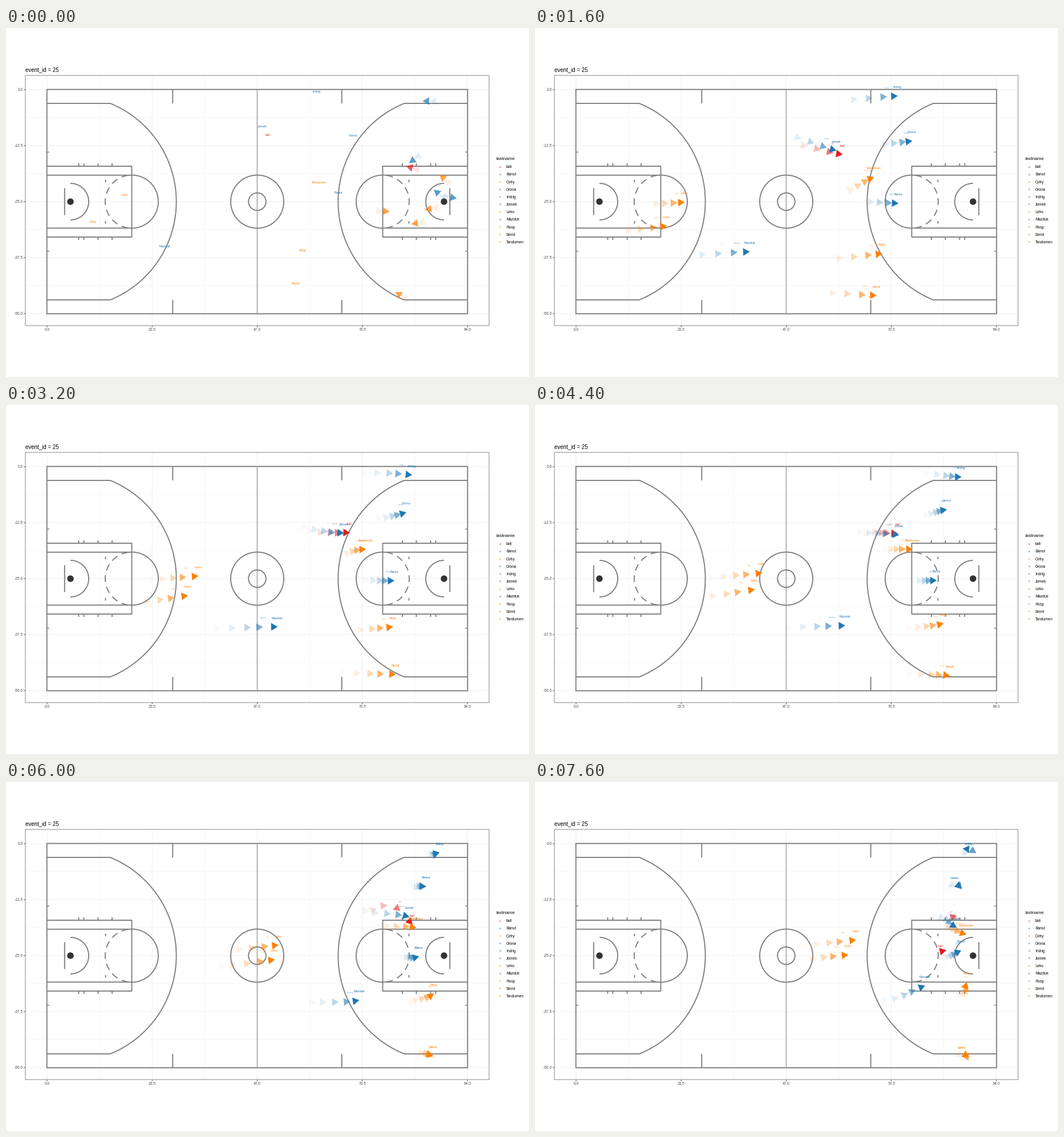
Write a matplotlib script that moves like this. It is 917 px wide and 611 px high and loops after 8 s.

```python
import numpy as np
import matplotlib.pyplot as plt
from matplotlib.animation import FuncAnimation
from matplotlib.patches import Circle, Polygon, Rectangle

W, H, DPI = 917, 611, 100
PX = 72 / DPI
FRAMES, INTERVAL = 20, 400
BLUE, ORANGE, RED = "#1f78b4", "#ff7f00", "#e31a1c"
LINE, GRID, TICK = "#7f7f7f", "#ebebeb", "#333333"
LEFT, RIGHT, TOP, BOTTOM = 72, 809, 108, 500
MID_X, MID_Y = 440.5, 304
LABEL_PX, LABEL_RISE = 5.6, 15.5
ARROW, TIP = 7.7, 7.2
WAKE = 5

plt.rcParams["font.family"] = "Liberation Sans"
fig = plt.figure(figsize=(W / DPI, H / DPI), dpi=DPI, facecolor="white")
ax = fig.add_axes([0, 0, 1, 1])
ax.set_xlim(0, W)
ax.set_ylim(H, 0)
ax.axis("off")


def line(xs, ys, color=LINE, width=1.9, z=2):
    ax.plot(xs, ys, color=color, lw=width * PX, zorder=z,
            solid_capstyle="butt", snap=False)


def box(x0, y0, x1, y1, color, width):
    ax.add_patch(Rectangle((x0, y0), x1 - x0, y1 - y0, fill=False, ec=color,
                           lw=width * PX, zorder=2, snap=False))


def text(x, y, s, size, color="black", ha="left", **kw):
    return ax.text(x, y + 0.35 * size, s, fontsize=size * PX, color=color,
                   ha=ha, va="baseline", **kw)


def arc(x, r, start, end):
    a = np.radians(np.linspace(start, end, 120))
    line(x + r * np.cos(a), MID_Y + r * np.sin(a))


# ---- plot panel ----
def draw_panel():
    for i in range(5):
        x, y = LEFT + i * 184.25, TOP + i * 98
        line([x, x], [83, 521], GRID, 0.8, 0)
        line([34, 847], [y, y], GRID, 0.8, 0)
        if i < 4:
            line([x + 92.1] * 2, [83, 521], GRID, 0.4, 0)
            line([34, 847], [y + 49] * 2, GRID, 0.4, 0)
        line([x, x], [521, 524], TICK, 0.8)
        line([31, 34], [y, y], TICK, 0.8)
        text(x, 527.5, f"{23.5 * i:.1f}", 6.6, "#4d4d4d", "center")
        text(30, y, f"{-12.5 * i:.1f}" if i else "0.0", 6.6, "#4d4d4d", "right")
    box(34, 83, 847, 521, TICK, 0.6)
    text(34, 73, "event_id = 25", 9.8)


# ---- court ----
def draw_half(flip):
    def X(*xs):
        return [2 * MID_X - x if flip else x for x in xs]

    def half_arc(x, r, mid, half):
        mid = 180 - mid if flip else mid
        arc(X(x)[0], r, mid - half, mid + half)

    for s in (-1, 1):
        def Y(*ds):
            return [MID_Y + s * d for d in ds]
        line(X(72, 183), Y(172, 172))
        line(X(292.3, 292.3), Y(172, 196))
        line(X(72, 220.5), Y(62, 62))
        line(X(72, 220.5), Y(46.3, 46.3))
        line(X(72, 76), Y(86.7, 86.7), width=1.4)
        line(X(174.5, 174.5), Y(34, 38.5))
        for x in (127.5, 136.5, 161.5, 186):
            line(X(x, x), Y(62, 67))
    line(X(220.5, 220.5), [241.3, 366.7])
    line(X(102.8, 102.8), [280.5, 327.5])
    half_arc(113, 185.6, 0, np.degrees(np.arcsin(172 / 185.6)))
    half_arc(113, 32, 0, 90)
    half_arc(220.5, 46.5, 0, 90)
    for dash in range(-3, 4):
        half_arc(220.5, 46.5, 180 + 25 * dash, 7.4)
    ax.add_patch(Circle((X(113)[0], MID_Y), 5.7, fc="#333333", lw=0, zorder=3))


def draw_court():
    box(LEFT - 0.3, TOP - 0.4, RIGHT + 0.3, BOTTOM + 0.3, LINE, 1.9)
    for flip in (False, True):
        draw_half(flip)
    line([MID_X] * 2, [TOP, BOTTOM], "#b3b3b3", 2)
    for r in (46.5, 15.3):
        arc(MID_X, r, 0, 360)


# ---- players: a smooth path through a few waypoints ----
def row(frame):
    """Data row sampled for a frame; steps alternate between 4 and 5 rows."""
    return np.floor(np.asarray(frame) * 65 / 14 + 0.25)


def spline(t, knots, points):
    slope = np.gradient(points, knots, axis=0)
    i = int(np.clip(np.searchsorted(knots, t, side="right") - 1, 0, len(knots) - 2))
    h = knots[i + 1] - knots[i]
    u = (t - knots[i]) / h
    return ((1 + 2 * u) * (1 - u) ** 2 * points[i] + u * (1 - u) ** 2 * h * slope[i]
            + u * u * (3 - 2 * u) * points[i + 1] + u * u * (u - 1) * h * slope[i + 1])


tracks = []


def track(name, color, *points, keys=(0, 4, 11, 15, 19)):
    knots, points = row(keys), np.array(points, float)
    states = []
    for t in row(range(FRAMES)):
        pos = spline(t, knots, points)
        dx, dy = pos - spline(max(t - 1, 0), knots, points)
        states.append((*pos, np.arctan2(dy, dx)))
    tracks.append((name, color, states))


track("ball", RED, (459.5, 203), (539, 221.5), (602.5, 223.5), (636, 225),
      (691, 225.5), (712.5, 249.5), (730, 243), (711.5, 303),
      keys=(0, 4, 8, 11, 14, 15, 18, 19))
track("Banut", BLUE, (582.5, 304), (637, 307), (704, 307), (724, 305.5), (747, 295))
track("Cofry", ORANGE, (152.5, 355), (231, 346.5), (385, 323), (471, 311), (549, 302.5))
track("Grona", BLUE, (609, 204), (661, 197.5), (722, 183), (736.5, 183), (735.5, 183.5))
track("Indrig", BLUE, (545, 126.5), (635.5, 119), (747.5, 126), (760, 123.5), (760.5, 123.8))
track("Jomek", BLUE, (449, 187.5), (528, 214.5), (638, 227.5), (707, 236), (739, 255))
track("Leku", ORANGE, (207.5, 308), (262, 305), (398, 294), (477.5, 285.5), (562.5, 276.5))
track("Mazduk", BLUE, (278, 397.5), (376, 391.5), (543.5, 386), (619, 382), (683.5, 356.5))
track("Rosp", ORANGE, (520, 404.5), (608.5, 395), (716, 382.5), (750, 370.5), (757, 350.5))
track("Semil", ORANGE, (507.5, 462.5), (598.5, 468.5), (727, 474), (749, 480), (748.3, 480.8))
track("Tandumen", ORANGE, (549, 285.5), (594, 261), (662, 252.5), (719, 255), (756, 267))

# Where the preceding play ended: centre and heading in degrees.
last_play = {
    BLUE: [(738, 128, 180), (713, 232, 145), (756, 288, 220), (783, 297, 10)],
    RED: [(709, 244, 195)],
    ORANGE: [(766, 262, 220), (742, 317, 170), (718, 342, 170),
             (665, 321, 5), (689, 466, 212)],
}

moving = []


def fade(age):
    return max(0, 1 - age / 6) ** 3


def arrow(x, y, heading, color, alpha):
    a = heading + np.radians([0, 120, 240])
    corners = np.column_stack([x + ARROW * np.cos(a), y + ARROW * np.sin(a)])
    moving.append(ax.add_patch(Polygon(corners, fc=color, lw=0, alpha=alpha, zorder=5)))


def draw_last_play(n):
    for color, ends in last_play.items():
        for x, y, degrees in ends:
            a = np.radians(degrees)
            arrow(x - 12 * np.cos(a), y - 12 * np.sin(a), a, color, fade(n + 3))
            arrow(x, y, a, color, fade(n + 1) if n else 0.72)


def update(n):
    while moving:
        moving.pop().remove()
    if n < 4:
        draw_last_play(n)
    for age in range(min(n, WAKE), -1, -1):
        k = fade(age)
        for name, color, states in tracks:
            x, y, a = states[n - age]
            if n > age:
                arrow(x - TIP * np.cos(a), y - TIP * np.sin(a), a, color, k)
            if age < 3:
                moving.append(text(x, y - LABEL_RISE, name, LABEL_PX * k, color,
                                   "center", alpha=k, zorder=6))
    return moving


def draw_legend():
    text(860, 228, "lastname", 8.2)
    for i, (name, color, _) in enumerate(tracks):
        y = 243 + 13.15 * i
        text(866.5, y, "a", 5, color, "center")
        text(877, y, name, 6.6)


draw_panel()
draw_court()
draw_legend()
anim = FuncAnimation(fig, update, frames=FRAMES, interval=INTERVAL,
                     init_func=lambda: update(0), repeat=True, repeat_delay=0, blit=False)
plt.show()
```
